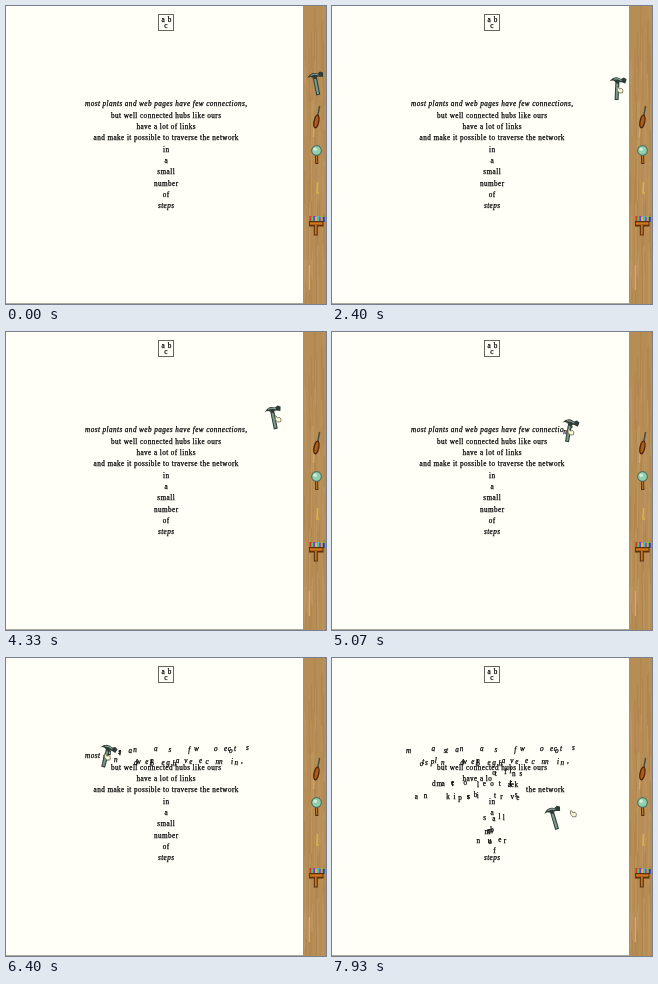
An HTML page with a canvas for the animation above (8 s loop, 320 by 298 pixels).

```html
<!DOCTYPE html>
<html lang="en">
<head>
<meta charset="utf-8">
<title>Hammer and words</title>
<style>
  html, body { margin: 0; width: 100%; height: 100%; overflow: hidden; background: #fffff8; }
  canvas { display: block; width: 320px; height: 298px; }
</style>
</head>
<body>
<canvas id="stage"></canvas>
<script>
const W = 320, H = 298, LOOP = 8000;
const GRAB = 1900, LAG = 35, FLIGHT = 420, REACH = 5.5;
const PITCH = 11.35, SPACING = 0.42;
const FACE = '7.2px "Liberation Serif", "Times New Roman", serif';
const PAPER = '#fffff8', INK = '#080808';

const canvas = document.getElementById('stage');
const scale = Math.max(1, window.devicePixelRatio || 1);
canvas.width = W * scale;
canvas.height = H * scale;
const ctx = canvas.getContext('2d');

const clamp = (v, lo, hi) => Math.min(hi, Math.max(lo, v));
function seeded(seed) {
  return () => (seed = seed * 16807 % 2147483647) / 2147483647;
}

const lines = [
  'most plants and web pages have few connections,',
  'but well connected hubs like ours',
  'have a lot of links',
  'and make it possible to traverse the network',
  'in', 'a', 'small', 'number', 'of', 'steps'
];
const fontOf = row => (row === 0 || row === 9 ? 'italic ' : '') + FACE;

// Key points of the hand: [time, x, y]
const route = [
  [900, 262, 118], [1400, 294, 96], [GRAB, 314.5, 79], [2700, 272, 87], [4400, 272, 87],
  [5050, 241, 100], [6550, 86, 99], [6680, 90, 127], [7130, 181, 127], [7210, 193, 127],
  [7270, 191, 117], [7390, 170, 117], [7450, 185, 140], [7510, 178, 164], [7570, 153, 164],
  [7620, 152, 175], [7690, 176, 175], [7750, 163, 186], [7930, 241, 156], [LOOP, 268, 146]
];

function handAt(t) {
  const i = route.findIndex(k => k[0] > t);
  if (i < 1) return i ? { x: 268, y: 146 } : { x: route[0][1], y: route[0][2] };
  const [t0, x0, y0] = route[i - 1], [t1, x1, y1] = route[i];
  const p = (t - t0) / (t1 - t0);
  return { x: x0 + (x1 - x0) * p, y: y0 + (y1 - y0) * p };
}

// The hammer trails the hand and leans against its motion.
function hammerAt(t) {
  const past = handAt(Math.max(GRAB, t - LAG));
  const speed = (handAt(Math.max(GRAB, t)).x - past.x) / LAG;
  return { x: past.x - 5, y: past.y - 2, tilt: clamp(-speed * 260, -5, 27) };
}

function layLetters() {
  const rand = seeded(41);
  return lines.flatMap((line, row) => {
    ctx.font = fontOf(row);
    const widths = [...line].map(c => ctx.measureText(c).width);
    let x = 160 - (widths.reduce((a, b) => a + b + SPACING, 0) - SPACING) / 2;
    return [...line].map((char, i) => {
      const letter = { char, row, x: x + widths[i] / 2, y: 100.3 + row * PITCH, hit: Infinity };
      letter.dx = (rand() - 0.5) * 10;
      letter.dy = (rand() < 0.5 ? -6.5 : 6) + (rand() - 0.5) * 3;
      x += widths[i] + SPACING;
      return letter;
    }).filter(l => l.char !== ' ');
  });
}

// A letter flies off when the hammer first touches it.
function findHits(letters) {
  for (let t = GRAB; t < LOOP; t += 5) {
    const { x, y } = hammerAt(t);
    for (const l of letters) {
      const touched = Math.abs(l.x - x) < REACH && Math.abs(l.y - 2 - (y + 5)) < REACH;
      if (touched && l.hit > t) l.hit = t;
    }
  }
}

function path(points) {
  ctx.beginPath();
  points.forEach(p => ctx.lineTo(...p));
}
function stroke(color, width, ...points) {
  ctx.strokeStyle = color;
  ctx.lineWidth = width;
  path(points);
  ctx.stroke();
}
function box(color, x, y, w, h) {
  ctx.fillStyle = color;
  ctx.fillRect(x, y, w, h);
}
function oval(color, x, y, rx, ry = rx, turn = 0) {
  ctx.fillStyle = color;
  ctx.beginPath();
  ctx.ellipse(x, y, rx, ry, turn, 0, 7);
  ctx.fill();
}
function glyph(char, x, y) {
  ctx.fillText(char, x, y);
  ctx.strokeText(char, x, y);
}
function useInk() {
  ctx.textAlign = 'center';
  ctx.fillStyle = ctx.strokeStyle = INK;
  ctx.lineWidth = 0.25;
}

function drawPage() {
  box(PAPER, 0, 0, W, H);
  box('#a9a99c', 0, 297, 297, 1);
  ctx.strokeStyle = '#66665a';
  ctx.lineWidth = 1;
  ctx.strokeRect(152.5, 8.5, 15, 16);
  useInk();
  ctx.font = FACE;
  glyph('a', 157, 15.5);
  glyph('b', 163.5, 15.5);
  glyph('c', 159.8, 22);
}

function drawWood() {
  box('#b68d55', 297, 0, 23, H);
  const rand = seeded(7);
  for (let i = 0; i < 60; i++) {
    const x = 298 + rand() * 21, y = rand() * H - 20;
    box(i % 2 ? '#b0864e' : '#bd9560', x, y, 1, 20 + rand() * 60);
  }
  stroke('#dcb04a', 1.6, [311.5, 176], [311, 187], [313, 187]);
  stroke('#d9ad58', 1.2, [308, 121], [307.5, 131]);
  stroke('#f0a468', 1.2, [303.3, 259], [303.3, 284]);
}

function drawTools() {
  stroke('#4a4d44', 1.5, [313.6, 100], [311.5, 111]);
  oval('#4a230a', 310.4, 115.5, 3, 7.2, 0.2);
  oval('#b05c14', 310.4, 115.5, 1.7, 5.8, 0.2);

  stroke('#55300f', 3.2, [310.5, 149], [310.8, 158]);
  stroke('#b87428', 1.3, [310.5, 150], [310.8, 157]);
  oval('#53705f', 310.5, 144.5, 5.4);
  oval('#8fd0ad', 310.5, 144.5, 4.3);
  oval('#cdeedb', 309.2, 143.2, 1.8);

  for (let i = 0; i < 8; i++) {
    box(`hsl(${i * 137 % 360} 70% 52%)`, 303.5 + i * 1.9, 210 + i % 2, 1.9, 5);
  }
  box('#5a300e', 303, 215, 14.5, 5.5);
  box('#d0781c', 304, 216.3, 12.5, 2.4);
  stroke('#5a300e', 4, [309.8, 220], [309.8, 229.5]);
  stroke('#c87420', 1.8, [309.8, 219], [309.8, 228.5]);
}

function drawHammer({ x, y, tilt }) {
  ctx.save();
  ctx.translate(x, y);
  ctx.rotate(tilt * Math.PI / 180);
  stroke('#2b3d35', 4, [-0.8, -6], [2.8, 12]);
  stroke('#7b9c8d', 2, [-0.5, -4], [2.6, 11]);
  ctx.fillStyle = '#2f3b36';
  ctx.beginPath();
  ctx.moveTo(-8.5, -4.5);
  ctx.quadraticCurveTo(-5, -12, 2, -9.5);
  ctx.lineTo(4.5, -11.5);
  ctx.lineTo(7.6, -10.5);
  ctx.lineTo(7.4, -6);
  ctx.lineTo(3.5, -6.5);
  ctx.lineTo(-2.8, -5.2);
  ctx.quadraticCurveTo(-5.5, -7, -8.5, -4.5);
  ctx.fill();
  stroke('#93aa9d', 1, [-5, -7.6], [-1, -8.8], [3, -8.2]);
  ctx.restore();
}

function drawHand({ x, y }) {
  ctx.save();
  ctx.translate(x, y);
  path([[-3, -3], [-1.8, -3], [-0.6, -1], [1.8, -1.5], [3, 0], [2.6, 2.8], [-0.6, 3], [-2.6, 0.6]]);
  ctx.closePath();
  ctx.fillStyle = '#fffbd8';
  ctx.fill();
  ctx.strokeStyle = '#69654e';
  ctx.lineWidth = 0.8;
  ctx.stroke();
  ctx.restore();
}

function drawLetters(t) {
  useInk();
  for (const l of letters) {
    const ease = 1 - (1 - clamp((t - l.hit) / FLIGHT, 0, 1)) ** 2;
    ctx.font = fontOf(l.row);
    glyph(l.char, l.x + l.dx * ease, l.y + l.dy * ease);
  }
}

const letters = layLetters();
findHits(letters);

function draw(t) {
  ctx.setTransform(scale, 0, 0, scale, 0, 0);
  drawPage();
  drawWood();
  drawTools();
  drawLetters(t);
  drawHammer(hammerAt(t));
  if (t >= route[0][0]) drawHand(handAt(t));
}

const start = performance.now();
function tick() {
  draw((performance.now() - start) % LOOP);
  requestAnimationFrame(tick);
}
tick();
</script>
</body>
</html>
```
